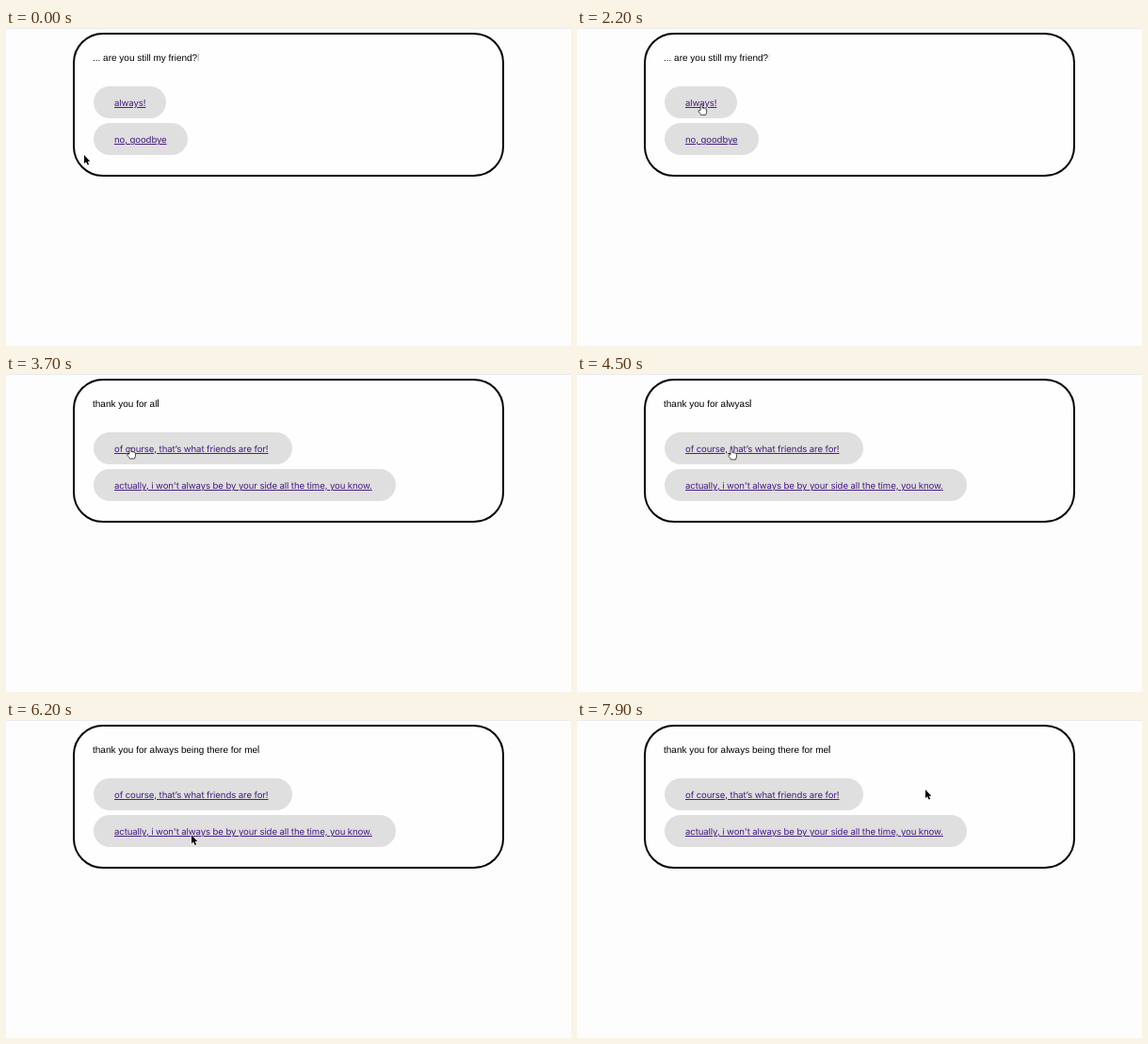
Recreate the animation shown at these times as an HTML page. Size 600 by 338 pixels, loop 8000 ms.

```html
<!DOCTYPE html>
<html lang="en">
<head>
<meta charset="utf-8">
<style>
  html, body { margin: 0; width: 100%; height: 100%; overflow: hidden; background: #fdfdfe; }
  svg { display: block; width: 600px; height: 338px; text-rendering: geometricPrecision; }
  text { white-space: pre; }
  #line { font: 10px "Liberation Sans", Arial, sans-serif; }
  .pill { fill: #dfdfdf; }
  .link { font: 9.6px Inter, sans-serif; letter-spacing: -.01em; fill: #451a80; text-decoration: underline; }
  #dialog { font-family: Inter, sans-serif; }
  #panel { fill: #fff; filter: drop-shadow(0 1px 2px rgba(0, 0, 0, .45)); }
</style>
</head>
<body>
<svg viewBox="0 0 600 338">
  <rect width="600" height="1" fill="#ebebed"/>
  <rect x="72" y="6" width="456" height="151" rx="31" fill="#fefefe" stroke="#000" stroke-width="2"/>
  <text id="line" x="92" y="34.6"></text>
  <rect id="caret" y="27" width="1" height="8"/>
  <rect class="pill" x="93" y="62" height="34" rx="17"/>
  <rect class="pill" x="93" y="101" height="34" rx="17"/>
  <text class="link" x="115" y="83"></text>
  <text class="link" x="115" y="122"></text>
  <g id="dialog">
    <rect id="panel" x="160" y="-10" width="280" height="69"/>
    <text x="170" y="16" font-size="8" fill="#4a4a4a">ur a great friend to me!</text>
    <rect x="390" y="29" width="40" height="20" rx="2" fill="#7a7a7a"/>
    <text x="409.5" y="41.7" font-size="7.4" fill="#fff" text-anchor="middle">OK</text>
  </g>
  <g id="pointer">
    <path id="arrow" d="M0 0V9L2.1 7.2 3.6 10.6 5.1 10 3.7 6.7H6.3Z" stroke="#fff" stroke-width="1" paint-order="stroke"/>
    <path id="hand" d="M-1 6.5V1.2Q-1 0 0 0T1 1.2V4.2Q2 3.6 2.7 4.5 3.7 4 4.3 5 5.5 4.7 5.5 6V8.5Q5 10 4.5 11.5H-.5Q-1 10-3 8-3.5 6.5-2.2 6.4Z"
      fill="#fff" stroke="#222" stroke-width=".8" stroke-linejoin="round"/>
  </g>
</svg>
<script>
const LOOP = 8000, STEP = 42, BLINK = 700;
const NAV = 2400, TYPE = 3000, ERASE = 4590, RETYPE = 4710;
const TYPO = 'thank you for alwyas', FINAL = 'thank you for always being there for me';
const KEEP = 'thank you for alw'.length;
const TYPED = TYPE + TYPO.length * STEP;
const DONE = RETYPE + (FINAL.length - KEEP) * STEP;

const pages = [
  [['always!', 77], ['no, goodbye', 100]],
  [['of course, that’s what friends are for!', 211],
   ["actually, i won't always be by your side all the time, you know.", 321]]
];

// Pointer tip: time, x, y
const path = [
  [0, 83, 135], [300, 88, 133], [900, 124, 120], [1300, 135, 119], [1700, 134, 112],
  [2300, 132, 78.5], [3850, 132, 78.5], [4300, 164, 79], [4520, 164, 79.5],
  [4750, 158, 103], [5150, 145, 103], [5650, 145, 103], [6150, 197, 122.5], [6280, 197, 122],
  [6400, 197, 121], [6620, 197, 121], [7200, 418, 38], [7500, 418, 38], [7850, 370, 74], [8000, 370, 74]
];

const $ = id => document.getElementById(id);
const [line, caret, dialog, pointer, arrow, hand] =
  ['line', 'caret', 'dialog', 'pointer', 'arrow', 'hand'].map($);
const pills = document.querySelectorAll('.pill'), links = document.querySelectorAll('.link');
const smooth = u => u * u * (3 - 2 * u);
const show = (el, on) => el.setAttribute('visibility', on ? 'visible' : 'hidden');

function typed(t) {
  if (t < NAV) return '... are you still my friend?';
  const count = Math.max(0, Math.floor((t - TYPE) / STEP));
  if (t < ERASE) return TYPO.slice(0, count);
  if (t < RETYPE) return TYPO.slice(0, -1 - Math.floor((t - ERASE) / 40));
  return FINAL.slice(0, KEEP + Math.floor((t - RETYPE) / STEP));
}

function blink(t) {
  const fade = start => {
    const phase = (t - start) % BLINK / BLINK * 2;
    const eased = smooth((phase % 1) ** .6);
    return phase < 1 ? 1 - eased : eased;
  };
  if (t < NAV) return fade(-150);
  if (t >= TYPED && t < ERASE) return fade(TYPED);
  if (t >= 7450) return fade(7200);
  return t >= DONE ? fade(DONE) : 1;
}

function tip(t) {
  const i = path.findIndex(p => p[0] > t);
  const [t0, x0, y0] = path[i - 1], [t1, x1, y1] = path[i];
  const u = smooth((t - t0) / (t1 - t0));
  return [x0 + (x1 - x0) * u, y0 + (y1 - y0) * u];
}

function draw(t) {
  line.textContent = typed(t);
  const width = line.textContent ? line.getComputedTextLength() : 0;
  caret.setAttribute('x', 92.5 + width);
  caret.setAttribute('opacity', blink(t));
  pages[t < NAV ? 0 : 1].forEach(([label, w], i) => {
    links[i].textContent = label;
    pills[i].setAttribute('width', w);
  });
  show(dialog, t >= 6400 && t < 7500);
  const grabbing = t >= 1900 && t < 5700;
  show(hand, grabbing);
  show(arrow, !grabbing);
  pointer.setAttribute('transform', `translate(${tip(t)})`);
}

const start = performance.now();
function tick() {
  draw((performance.now() - start) % LOOP);
  requestAnimationFrame(tick);
}
tick();
</script>
</body>
</html>
```
